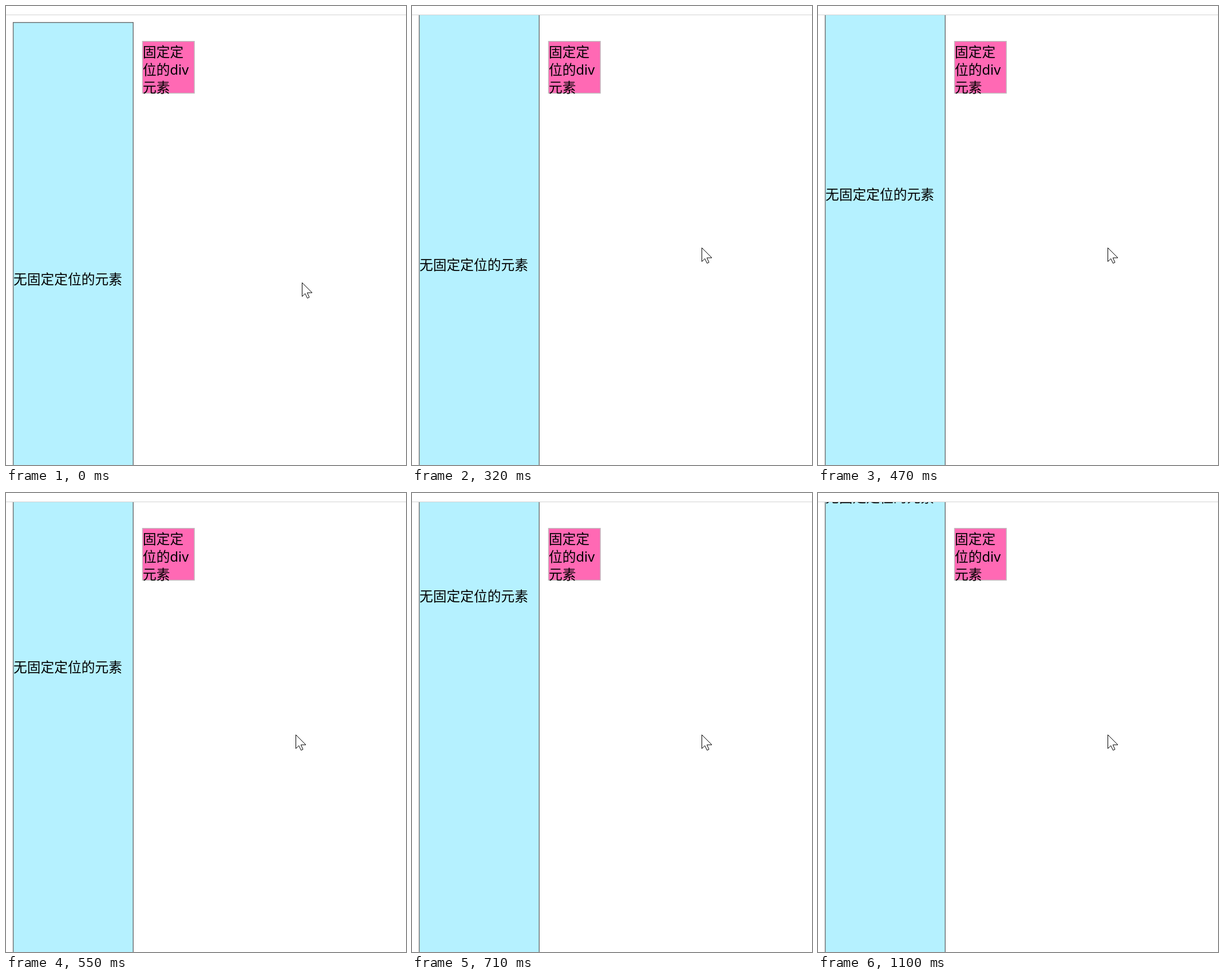
An HTML page that plays this animation: 699x802 px, repeating every 1480 ms.

```html
<!DOCTYPE html>
<html lang="zh-CN">
<head>
<meta charset="utf-8">
<style>
html, body { margin: 0; width: 100%; height: 100%; overflow: hidden; background: #fff; }
svg { display: block; }
text { font: 23.75px "Noto Sans", "Noto Sans CJK SC", "Noto Sans CJK", sans-serif; }
</style>
</head>
<body>
<svg width="699" height="802" viewBox="0 0 699 802">
  <clipPath id="view"><rect y="16" width="699" height="786"/></clipPath>
  <g clip-path="url(#view)">
    <g id="page">
      <rect x="12.6" y="28.8" width="209.7" height="1500" fill="#b5f1ff" stroke="#6b6b6b" stroke-width="1.4"/>
      <text x="13" y="486">无固定定位的元素</text>
    </g>
  </g>
  <path d="M0 15.5H699" stroke="#d3d3d3"/>
  <rect x="238.5" y="61.7" width="90.7" height="90.7" fill="#ff69b4" stroke="#c0c0c0" stroke-width="1.4"/>
  <text x="239" y="89">固定定</text>
  <text x="239" y="120">位的div</text>
  <text x="239" y="151">元素</text>
  <path id="cursor" d="M.5 .5V24.5L5.8 19.5L9.6 27.5L13 26L9.4 18H18Z" fill="#fff" stroke="#000"/>
</svg>
<script>
const LOOP = 1480, STEP = 80, NOTCH = 148.5;
const wheelTurns = [230, 470, 850, 1010];
const page = document.getElementById('page');
const cursor = document.getElementById('cursor');

// Progress 0..1 of a move that takes three held steps
const progress = ms => Math.min(3, Math.max(0, Math.floor(ms / STEP))) / 3;
const ease = x => x < .5 ? (2 * x) ** 2.7 / 2 : 1 - ease(1 - x);
const place = (el, x, y) =>
  el.setAttribute('transform', `translate(${Math.round(x)} ${Math.round(y)})`);

function draw(t) {
  const turns = wheelTurns.reduce((sum, start) => sum + ease(progress(t - start)), 0);
  const glide = progress(t + 10);
  place(page, 0, -turns * NOTCH);
  place(cursor, 517 - 11 * glide, 483 - 61 * glide);
}

const origin = performance.now();
function tick() {
  draw((performance.now() - origin) % LOOP);
  requestAnimationFrame(tick);
}
tick();
</script>
</body>
</html>
```
